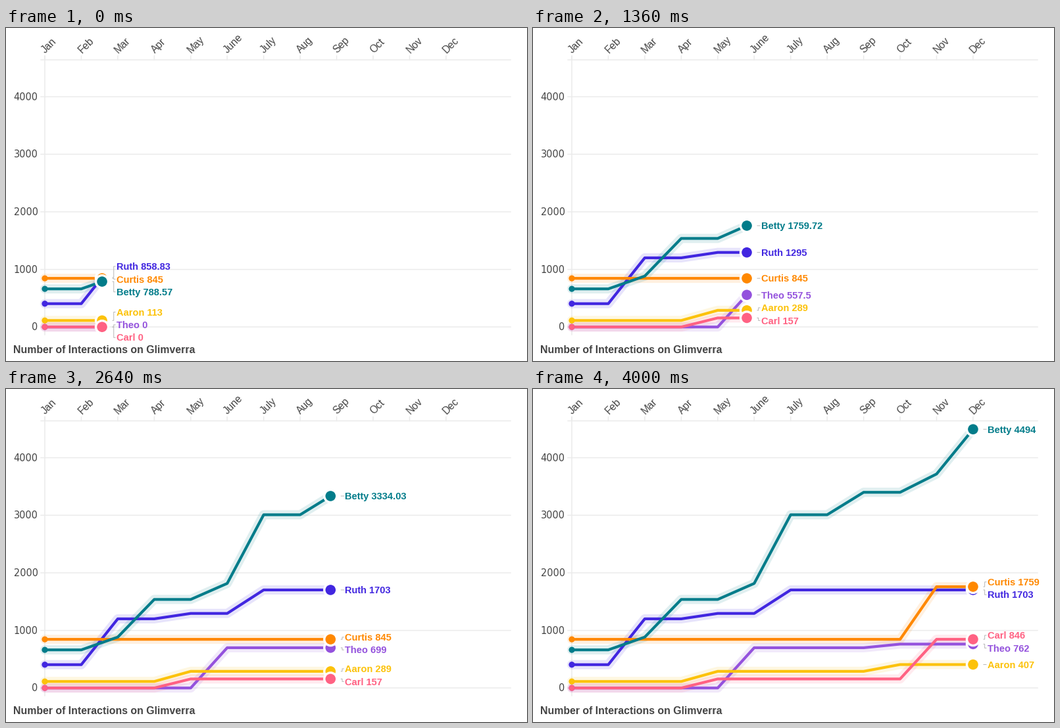
Recreate the animation shown at these times as a matplotlib script. Size 792 by 507 pixels, loop 4.32 s.

```python
import matplotlib.pyplot as plt
import numpy as np
from matplotlib.animation import FuncAnimation
from matplotlib.patches import Circle

W, H = 792, 507
FRAMES, STEP = 54, 80
X0, DX = 59, 55.45          # first month and month spacing
Y0, UNIT = 455.2, 0.08765   # zero line and pixels per interaction
RIGHT, TOP = 767, 48.5
ROW = 19.4                  # least distance between labels
GREY, INK = "#ebebeb", "#444444"
MONTHS = "Jan Feb Mar Apr May June July Aug Sep Oct Nov Dec".split()

# name, colour, monthly totals; later entries lie on top
SERIES = [
    ("Ruth", "#4126e0", [405] * 2 + [1201] * 2 + [1295] * 2 + [1703] * 6),
    ("Theo", "#9452dd", [0] * 5 + [699] * 4 + [762] * 3),
    ("Aaron", "#fcc20a", [113] * 4 + [289] * 5 + [407] * 3),
    ("Curtis", "#ff8800", [845] * 10 + [1759] * 2),
    ("Betty", "#027c8a", [662, 662, 884, 1538, 1538, 1816,
                          3009, 3009, 3399, 3399, 3717, 4494]),
    ("Carl", "#ff6283", [0] * 4 + [157] * 6 + [846] * 2),
]

# month position reached at certain frames
KEY_FRAMES = [0, 5, 13, 21, 33, 39, 49, 50]
KEY_MONTHS = [1.570135, 2.476284, 4.047568, 5.547569, 7.83341, 9, 10.905, 11]


def px(month):
    return X0 + DX * np.asarray(month)


def py(value):
    return Y0 - UNIT * np.asarray(value)


def fmt(value):
    return f"{value:.2f}".rstrip("0").rstrip(".")


def spread(ys):
    """Push overlapping labels apart, keeping each cluster centred."""
    order = sorted(range(len(ys)), key=lambda i: ys[i])
    groups = []
    for i in order:
        groups.append([i])
        while len(groups) > 1:
            a, b = groups[-2:]
            low = np.mean([ys[k] for k in a]) + ROW * (len(a) - 1) / 2
            high = np.mean([ys[k] for k in b]) - ROW * (len(b) - 1) / 2
            if high - low >= ROW:
                break
            groups[-2:] = [a + b]
    out = [0.0] * len(ys)
    for group in groups:
        mid = np.mean([ys[k] for k in group])
        for n, k in enumerate(group):
            out[k] = mid + ROW * (n - (len(group) - 1) / 2)
    return out


fig = plt.figure(figsize=((W + 1e-6) / 72, (H + 1e-6) / 72), dpi=72, facecolor="white")
ax = fig.add_axes([0, 0, 1, 1])
ax.set_xlim(0, W)
ax.set_ylim(H, 0)
ax.axis("off")


def stroke(xs, ys, color, width, z, **kw):
    line, = ax.plot(xs, ys, color=color, lw=width, zorder=z, snap=False,
                    solid_joinstyle="round", **kw)
    return line


def write(x, y, text, size, color=INK, font="Liberation Sans", **kw):
    return ax.text(x, y, text, fontsize=size, color=color, family=font,
                   va="baseline", zorder=8, **kw)


def draw_axes():
    stroke([X0 - 6, RIGHT], [TOP, TOP], GREY, 1.5, 1)
    stroke([X0, X0], [TOP - 6, 467], GREY, 1.5, 1)
    for value in range(0, 5000, 1000):
        y = float(py(value))
        stroke([X0 - 6, RIGHT], [y, y], GREY, 1.5, 1)
        write(48.5, y + 5.2, str(value), 14.5, font="DejaVu Sans", ha="right")
    for m, month in enumerate(MONTHS):
        x = float(px(m))
        stroke([x, x], [TOP - 6, TOP], GREY, 1.5, 1)
        write(x + 1, 39, month, 15.5, rotation=45, rotation_mode="anchor", ha="left")
    write(10.5, 495.3, "Number of Interactions on Glimverra", 15.9, weight="bold")


class Track:
    def __init__(self, rank, name, color, values):
        self.name, self.values = name, values
        self.halo = stroke([], [], color, 14, 2 + rank / 10, alpha=0.12,
                           solid_capstyle="round")
        self.line = stroke([], [], color, 4.2, 3 + rank / 10, solid_capstyle="butt")
        self.leader = stroke([], [], "#b8b8b8", 1, 1.5)
        ax.add_patch(Circle((X0, py(values[0])), 4.6, fc=color, ec="none",
                            zorder=4 + rank / 10))
        self.dot = ax.add_patch(Circle((0, 0), 9.5, fc=color, ec="white", lw=3.4,
                                       zorder=5 + rank / 10))
        self.label = write(0, 0, "", 14.6, color, weight="bold", ha="left")

    def value(self, u):
        return float(np.interp(u, range(12), self.values))

    def update(self, u, label_y):
        months = [m for m in range(12) if m < u] + [u]
        xs = px(months)
        ys = py([self.value(m) for m in months])
        self.halo.set_data(xs, ys)
        self.line.set_data(xs, ys)
        x, y = xs[-1], ys[-1]
        self.dot.center = (x, y)
        self.leader.set_data([x + 16, x + 17.7, x + 17.7, x + 20],
                             [y, y, label_y, label_y])
        self.label.set_position((x + 22, label_y + 5.2))
        self.label.set_text(f"{self.name} {fmt(self.value(u))}")


draw_axes()
tracks = [Track(rank, *row) for rank, row in enumerate(SERIES)]


def update(frame):
    u = float(np.interp(frame, KEY_FRAMES, KEY_MONTHS))
    rows = spread([float(py(t.value(u))) for t in tracks])
    for track, y in zip(tracks, rows):
        track.update(u, y)
    return []


anim = FuncAnimation(fig, update, frames=FRAMES, interval=STEP,
                     init_func=lambda: update(0), repeat=True, repeat_delay=0)
plt.show()
```
